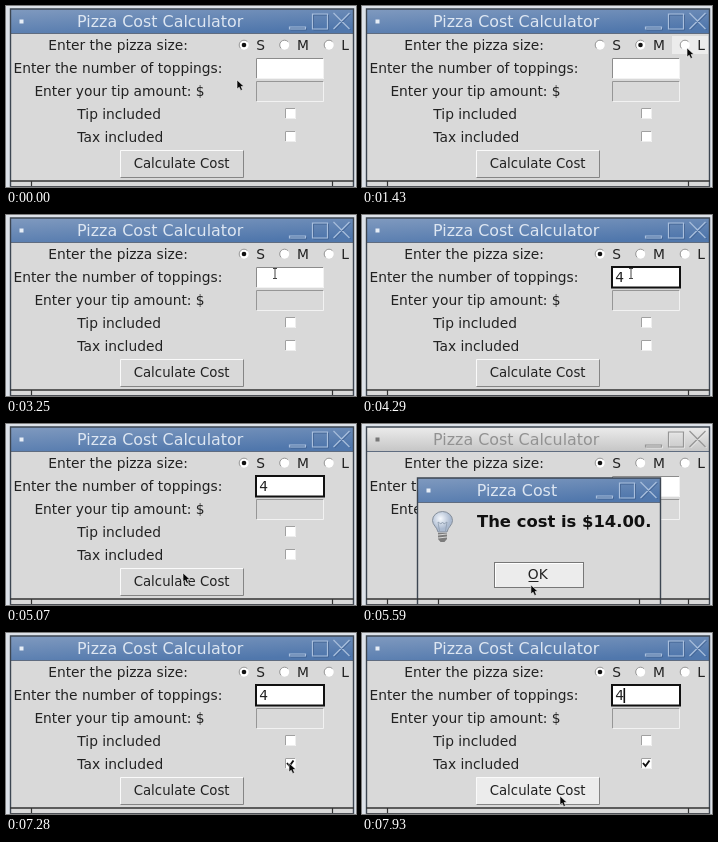
An HTML page that plays this animation: 350 by 181 pixels, repeating every 8 s.

```html
<!DOCTYPE html>
<html lang="en">
<head>
<meta charset="utf-8">
<title>Pizza Cost Calculator</title>
<style>
html, body { margin: 0; width: 100%; height: 100%; overflow: hidden; background: #dde2e9; }
svg { display: block; width: 100%; height: 100%; }
text { font: 13.8px "DejaVu Sans", sans-serif; fill: #222; white-space: pre; }
.title { font-size: 15.9px; fill: #dde6f2; }
.bar { fill: url(#blue); }
.icons { fill: none; stroke: #a9bfdd; stroke-width: 1.2; }
.shade { fill: none; stroke: #3f6090; }
.dot { fill: #e6edf6; }
.inactive .bar { fill: url(#gray); }
.inactive .title { fill: #929292; }
.inactive .icons { stroke: #959595; }
.inactive .shade { stroke: #e9e9e9; }
.inactive .dot { fill: #777; }
.message { font-size: 16.4px; font-weight: bold; fill: #111; }
</style>
</head>
<body>
<svg id="stage" viewBox="0 0 350 181" preserveAspectRatio="none"></svg>
<script>
const LOOP = 8000, STEP = 130;
const stage = document.getElementById('stage');
const $ = id => document.getElementById(id);

const rect = (x, y, w, h, fill, more = '') =>
  `<rect x="${x}" y="${y}" width="${w}" height="${h}" fill="${fill}" ${more}/>`;
const line = (d, color, width = 1, more = '') =>
  `<path d="${d}" fill="none" stroke="${color}" stroke-width="${width}" ${more}/>`;
const text = (x, y, s, more = '') => `<text x="${x}" y="${y}" ${more}>${s}</text>`;

// Box with a two-tone edge: light/dark order decides raised or sunken
function bevel(x, y, w, h, fill, topLeft, bottomRight, id = '') {
  const r = x + w - .5, b = y + h - .5;
  return rect(x, y, w, h, fill, id && `id="${id}"`) +
    line(`M${x + .5} ${b}V${y + .5}H${r}`, topLeft, 1, id && `id="${id}A"`) +
    line(`M${x + .5} ${b}H${r}V${y + .5}`, bottomRight, 1, id && `id="${id}B"`);
}

function frame(x, y, right, title, titleX) {
  const r = right;
  const icons = `M${r - 64.5} ${y + 18}h16v2h-16zM${r - 41.5} ${y + 5}h15v15h-15z
    M${r - 20.5} ${y + 4}l16 16m0-16l-16 16`;
  return rect(x, y, r - x, 181 - y, '#d9d9d9') +
    rect(x, y, r - x, 24, '', 'class="bar"') +
    line(`M${x} ${y + 24.5}H${r}`, '#5f6c80') +
    line(`M${x + .5} 181V${y}H${r - .5}V181`, '#3d4652', 1.4) +
    rect(x + 9.5, y + 10.5, 4, 4, '', 'class="dot"') +
    text(titleX, y + 18, title, 'class="title"') +
    `<path class="shade" d="${icons}" transform="translate(1 1)"/>
    <path class="icons" d="${icons}"/>` +
    line(`M${x} 175H${r}`, '#333', 1.6) +
    line(`M${x + 21.5} 175V180M${r - 21.5} 175V180`, '#333', 1.2) +
    line(`M${x} 180.5H${r}`, '#4c4f55');
}

const radioX = [238, 278.5, 323];
const radios = ['S', 'M', 'L'].map((s, i) => {
  const x = radioX[i];
  return rect(x - 13, 30, 36, 18, '#ececec', `id="over${i}"`) +
    `<circle cx="${x}" cy="39" r="4.7" fill="#fff"/>` +
    line(`M${x - 3.4} 42.4A4.8 4.8 0 0 1 ${x + 3.4} 35.6`, '#969696') +
    `<circle id="pick${i}" cx="${x}" cy="39" r="2.3" fill="#111"/>` +
    text([250.2, 291, 335.3][i], 43.5, s);
}).join('');

const bulb = `<g>
  <path d="M76 108C75 103 70.5 101 70.5 96.5A10 9 0 0 1 90.5 96.5C90.5 101 86 103 85 108Z"
    fill="url(#glass)" stroke="#7d8794" stroke-width=".9"/>
  <path d="M77.5 107L76 98l3 2 1.5-2 1.5 2 3-2-1.5 9" fill="none" stroke="#8d9cae" stroke-width=".8"/>
  <path d="M76 109h9v6l-2.5 3h-4l-2.5-3z" fill="#7c7c7c"/>
  <path d="M76 111l9-1m-9 4l9-1" stroke="#d8d8d8"/></g>`;

stage.innerHTML = `<defs>
  <linearGradient id="blue" x2=".6" y2="1"><stop stop-color="#809abf"/>
    <stop offset="1" stop-color="#5077ac"/></linearGradient>
  <linearGradient id="gray" x2="0" y2="1"><stop stop-color="#ececec"/>
    <stop offset="1" stop-color="#c6c6c6"/></linearGradient>
  <radialGradient id="glass" cx=".4" cy=".35"><stop stop-color="#f6f9fd"/>
    <stop offset="1" stop-color="#abbad0"/></radialGradient></defs>
  <g id="main">` + frame(4, 3, 348, 'Pizza Cost Calculator', 71.1) +
  text(42.2, 43.5, 'Enter the pizza size:') +
  text(7.5, 66.5, 'Enter the number of toppings:') +
  text(28.4, 89.5, 'Enter your tip amount: $') +
  text(71.3, 112.5, 'Tip included') +
  text(71.3, 135.5, 'Tax included') + radios +
  bevel(250, 52, 68, 21, '#fff', '#8b8b8b', '#f2f2f2') +
  rect(250, 52, 68, 20.5, 'none', 'id="focus" stroke="#111" stroke-width="2"') +
  text(253.2, 66.8, '4', 'id="digit"') +
  rect(0, 55, 1.6, 15, '#111', 'id="caret"') +
  bevel(250, 75, 68, 21, '#d9d9d9', '#969696', '#f2f2f2') +
  bevel(279, 102, 11, 11, '#fff', '#a0a0a0', '#eee') +
  bevel(279, 125, 11, 11, '#fff', '#a0a0a0', '#eee') +
  line('M281 130l2.5 3 4-5.5', '#111', 1.9, 'id="tick"') +
  bevel(114, 144, 124, 28, '#d9d9d9', '#fafafa', '#858585', 'calc') +
  text(127.7, 162, 'Calculate Cost', 'style="font-size:13.3px"') +
  `</g><g id="dialog">` + frame(55, 54, 299, 'Pizza Cost', 114.7) + bulb +
  text(115, 102.5, 'The cost is $14.00.', 'class="message"') +
  rect(132.5, 138.5, 89, 25, '#ececec', 'stroke="#777"') +
  line('M133.5 163V139.5H221', '#fff') +
  text(165.8, 155, 'OK') + line('M166.5 157.5h10', '#222') + `</g>
  <path id="arrow" d="M0 0V9l2.2-1.8L3.7 10.5l1.8-.8L4.1 6.5H7Z" fill="#080808"
    stroke="#f4f4f4" stroke-width=".6"/>
  <path id="beam" d="M-2-5.5H2M0-5.5V4.5M-2 4.5H2" fill="none" stroke="#444"/>`;

// Pointer track: time, x, y
const track = [
  [0, 231, 74], [650, 277, 40], [1040, 278, 40], [1430, 325, 42], [1690, 323, 41],
  [1950, 318, 41], [2080, 318, 41], [2600, 239, 40], [2990, 240, 41], [3250, 269, 59],
  [4550, 269, 59], [5070, 177, 149], [5330, 169, 161], [6630, 168.5, 161],
  [7150, 283, 130], [7280, 283, 130], [7800, 202, 161], [7930, 198, 163]
];

function pointer(t) {
  const i = track.findIndex(k => k[0] > t);
  if (i < 0) return track[track.length - 1].slice(1);
  const [t0, x0, y0] = track[i - 1], [t1, x1, y1] = track[i];
  const p = (t - t0) / (t1 - t0);
  return [x0 + (x1 - x0) * p, y0 + (y1 - y0) * p];
}

const show = (id, on) => $(id).setAttribute('visibility', on ? 'visible' : 'hidden');
const within = (t, a, b) => t >= a && t < b;

function draw(now) {
  const t = Math.floor(now % LOOP / STEP) * STEP;
  const [x, y] = pointer(t);
  const modal = within(t, 5590, 6500);
  const inEntry = x > 250 && x < 318 && y > 52 && y < 73;
  const choice = within(t, 910, 1560) ? 1 : within(t, 1560, 2730) ? 2 : 0;

  radioX.forEach((cx, i) => {
    show('pick' + i, i === choice);
    show('over' + i, y > 30 && y < 48 && x > cx - 13 && x < cx + 23);
  });

  const focused = t >= 3510 && !modal;
  const typed = t >= 4290;
  const blinkStart = t < 6500 ? 3510 : 6500;
  show('focus', focused);
  show('digit', typed);
  show('caret', focused && (t - blinkStart) % 900 < 600);
  $('caret').setAttribute('x', typed ? 261.5 : 253.5);
  show('tick', t >= 7280);

  const over = !modal && x > 114 && x < 238 && y > 150 && y < 172;
  const pressed = within(t, 5330, 5590);
  $('calc').setAttribute('fill', over ? '#ececec' : '#d9d9d9');
  $('calcA').setAttribute('stroke', pressed ? '#858585' : '#fafafa');
  $('calcB').setAttribute('stroke', pressed ? '#fafafa' : '#858585');

  $('main').setAttribute('class', modal ? 'inactive' : '');
  show('dialog', modal);
  show('arrow', !inEntry);
  show('beam', inEntry);
  for (const id of ['arrow', 'beam']) $(id).setAttribute('transform', `translate(${x} ${y})`);
}

const start = performance.now();
function tick() {
  draw(performance.now() - start);
  requestAnimationFrame(tick);
}
tick();
</script>
</body>
</html>
```
